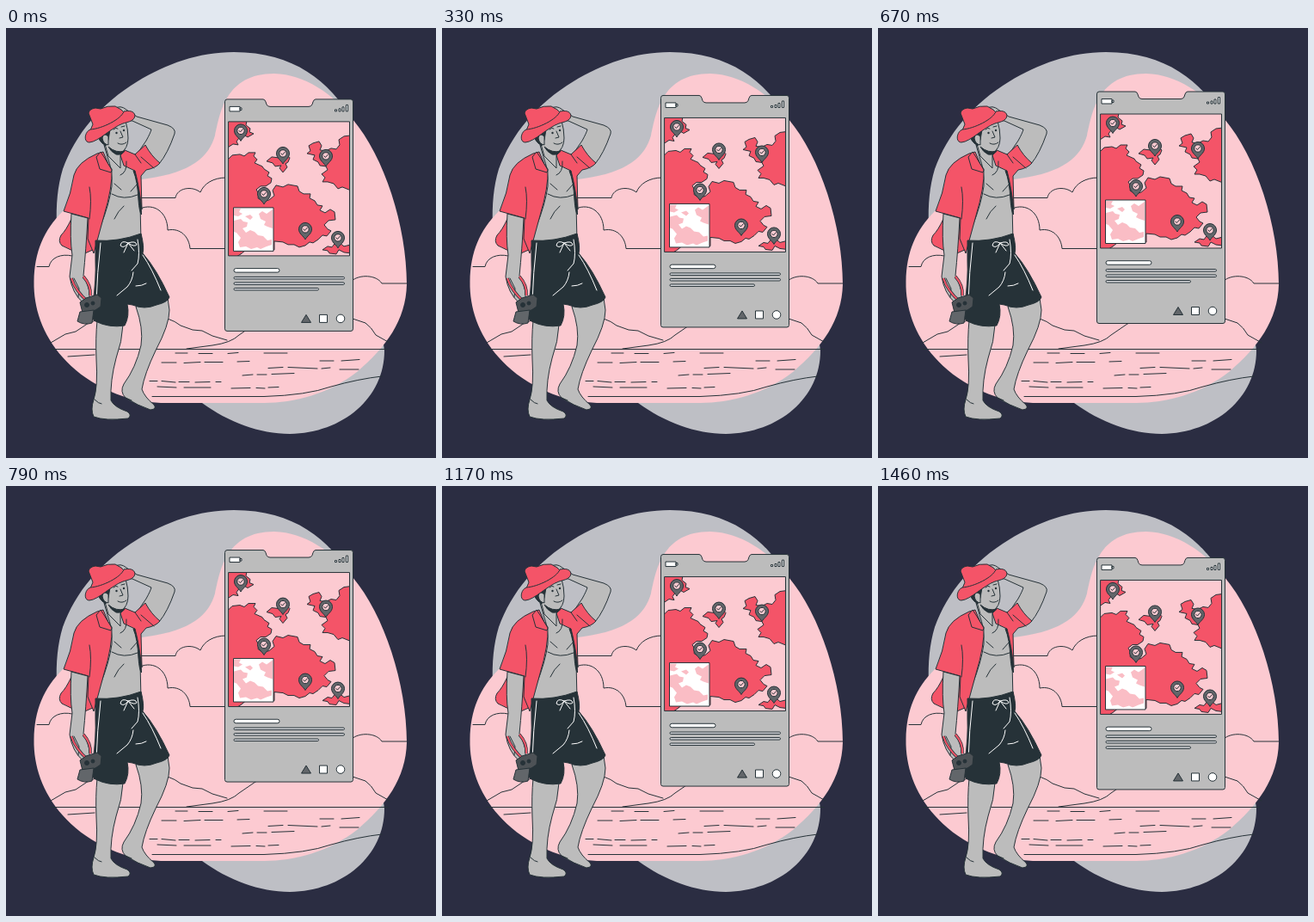
Recreate the animation shown at these times as an HTML page. Size 500 px wide and 500 px high, loop 1500 ms.

```html
<!DOCTYPE html>
<html lang="en">
<head>
<meta charset="utf-8">
<title>Traveller and map</title>
<style>
  html, body { margin: 0; width: 100%; height: 100%; overflow: hidden; background: #2b2d42; }
  svg { display: block; width: 100vw; height: 100vh; }
  .ln { fill: none; stroke: #263238; stroke-width: 1; stroke-linecap: round; stroke-linejoin: round; }
  .ol { stroke: #263238; stroke-width: 1; stroke-linejoin: round; }
  .wt { fill: none; stroke: #fff; stroke-width: 1; stroke-linecap: round; }
  .skin { fill: #bcbcbc; }
  .red { fill: #f45468; }
  .pink { fill: #fccad1; }
  .rose { fill: #fabdc5; }
  .dark { fill: #263238; }
  .steel { fill: #62666a; }
  .white { fill: #fff; }
</style>
</head>
<body>
<svg viewBox="0 0 500 500">
  <defs>
    <clipPath id="screen"><path d="M259 109H399.500V265H259Z"/></clipPath>
    <g id="pin">
      <path class="steel ol" d="M0 12C-2 8-7.500 5.500-7.500 0A7.500 7.500 0 0 1 7.500 0C7.500 5.500 2 8 0 12Z"/>
      <circle class="pink ol" r="4.200"/>
      <path class="ln" d="M-2 0L-.6 1.600L2.300-1.700"/>
    </g>
  </defs>

  <!-- backdrop -->
  <path fill="#bebfc5" d="M265 28C224 28 186 42 153 62C110 88 81 123 66 164C60 184 58 205 59 230L120 390L228 436C258 458 295 472 330 472C392 471 440 430 440 375L403 107C376 62 335 28 265 28Z"/>
  <path class="pink" d="M32.500 295C33 260 44 235 66 213C90 190 125 180 165 175C215 168 236 150 243 125C249 99 255 53 312 53C347 54 380 76 403 106C440 150 466 230 466 298C465 340 442 371 408 400C376 425 335 436 300 436H180C130 434 90 410 66 383C42 356 32 325 32.500 295Z"/>

  <!-- landscape -->
  <g class="ln">
    <path d="M154 197.500H197C199 186 216 183 226 191C230 181 241 174 256 174"/>
    <path d="M156 210C172 203 188 214 188 235C203 232 213 243 214 256.500H256"/>
    <path d="M36 277.500H50C52 267 64 262 77 265"/>
    <path d="M402 294C411 286 431 287 437 297H466"/>
    <path d="M52 366L69 356L81 353L96 343L107 339M188 338Q197 341 203 346L217 351L228 352L240 358L257 363"/>
    <path d="M210 373L240 369Q262 366 271 357L290 344L310 335L350 325L386 331L403 338L418 343Q425 348 430 357L446 366"/>
    <path d="M52 373.500H444M170 428.500H300Q350 427 378 417Q410 408 437 405"/>
    <path d="M72 382L103 380M197 378H211M224 378.500H240M258 378.500L270 377.500M300 378H327M181 389H198M207 389.500L226 388.500M231 388.500H252M269 388L283 387.500M365 387H381M390 387L411 385.500M305 395.500L322 394.500M328 394.500L362 396M367 396L377 395M388 397H410M275 404L287 403M292 403H303M309 402.500L335 401.500M167 410.500H176M181 410.500L197 412M201 411.500H213M220 412L237 411.500M244 411.500H250M176 417L198 418M207 418H238M262 419L284 418.500M291 418.500L301 419M305 418L317 417.500"/>
  </g>

  <!-- traveller -->
  <g class="ol">
    <path class="skin" d="M126 94Q133 89 140 95L152 103L188 113Q198 117 196 123Q188 146 178 158L150 150L163 131Q168 122 169 118L147 108L130 106Z"/>
    <path class="skin" d="M151 324Q160 349 157 369Q151 395 137 414Q132 423 139 430Q153 439 168 444Q176 443 172 438Q161 429 158 420Q161 402 174 375Q190 345 190 328L188 314Z"/>
    <path class="skin" d="M106 340Q104 360 105 385Q107 417 102 432Q98 444 102 452Q115 457 142 454Q147 450 141 446Q126 441 122 433Q121 410 128 384Q135 365 136 345Z"/>
    <path class="red" d="M76 222Q70 235 64 241Q60 248 65 253Q76 257 85 265L103 257L113 220L100 180Z"/>
    <path class="skin" d="M114 136L118 150Q124 165 123 184Q120 205 110 230L104 248H157L156 205L153 166L138 148L132 140Z"/>
    <path class="dark" d="M150 163Q157 182 157.500 217Q155 214 154 200Q153 178 148 166Z"/>
    <path class="red" d="M135 146L138 142L150 147L162 136Q169 149 179 157Q174 163 163 165L157 172L158 211Q155 185 150 166L137 160L133 148Z"/>
    <path class="red" d="M106 146L113 144L119 158L123 164Q124 185 114 218L102 262L95 245L96 221L67 213Q76 192 79 171Q83 156 106 146Z"/>
    <path class="red" d="M110 144L105 150L109 164L122 168L123 165L114 150Z"/>
    <path class="dark" d="M104 247Q130 249 157 239Q161 255 159 262Q175 280 190 313Q188 319 175 322Q161 328 147 322L141 321Q144 335 138 346Q120 349 104 341Q98 340 101 320Q105 291 104 270Z"/>
    <path class="skin" d="M76 216Q74 245 77 264L74 289Q77 308 89 319L96 319Q100 306 90 288Q93 258 95 221Z"/>
  </g>
  <g class="ln">
    <path d="M140 155Q141 168 133 171M123 193Q137 201 153 194M126 181L134 188M145 190L153 181M137 207Q130 213 126 222M97 222Q100 200 97 185M157 150L172 163M150 147L157 157M79 291L85 303L84 313"/>
    <path d="M103 432Q108 437 111 437M139 430L146 433"/>
  </g>
  <g class="wt">
    <path d="M110 250Q106 285 105 318M153 246Q156 263 153 274L146 282M148 284Q147 294 141 301L129 311M159 264Q170 280 180 305M151 300Q158 300 163 297"/>
    <path d="M142 250Q134 246 133 253Q137 257 142 250Q151 247 152 252Q149 255 142 250L137 261M142 250L149 259"/>
  </g>
  <path fill="none" stroke="#263238" stroke-width="3.500" d="M76 291Q81 306 95 318M90 289Q99 299 98 311"/>
  <path fill="none" stroke="#f45468" stroke-width="2" d="M76 291Q81 306 95 318M90 289Q99 299 98 311"/>
  <g class="ol">
    <path fill="#4d5256" d="M86 319L93 314L106 310L111 314L110 324L104 328L89 331Z"/>
    <path class="steel" d="M86 330L102 328L100 343Q91 346 83 341Z"/>
    <circle class="dark" cx="94" cy="322" r="2.500"/>
    <circle class="dark" cx="101" cy="320" r="2"/>
  </g>

  <!-- head -->
  <g class="ol">
    <path class="skin" d="M113 115L115 135L119 149L133 163L133 146Q142 140 142 128Q142 118 139 108L126 104Z"/>
    <path class="dark" d="M106 121L115 112L126 107L125 113L121 118L119 130L116 137Q107 132 106 121Z"/>
    <path class="dark" d="M119 138Q128 146 138 143Q135 148 128 147Q122 144 119 138Z"/>
    <path class="skin" d="M119 126Q113 121 112 128Q113 135 119 136Z"/>
    <path class="red" d="M98 119L101 112L96 99Q97 94 104 93L110 94Q118 90 127 91L134 95L138 99C130 109 113 118 98 119Z"/>
    <path class="red" d="M98 118C91 121 90 133 97 133C108 132 122 116 136 111C143 109 149 108 150 102C149 96 143 96 137 97C134 106 112 117 98 118Z"/>
  </g>
  <path class="ln" d="M125 118Q128 115 130 117M134 115L138 114M133 120L136 127L132 128M130 134Q135 137 140 133"/>
  <circle class="dark" cx="128.500" cy="122" r="1.200"/>
  <circle class="dark" cx="137" cy="119" r="1.200"/>

  <!-- phone -->
  <g id="phone">
    <path class="skin ol" d="M257 83H299Q301 83 302 86L303 89Q304 91.500 307 91.500H352Q355 91.500 356 89L357 86Q358 83 360 83H401Q403.500 83 403.500 86V350Q403.500 352.500 401 352.500H257Q254.500 352.500 254.500 350V86Q254.500 83 257 83Z"/>
    <path class="white ol" d="M260 91.500H272V97H260ZM272 93H274V95.500H272Z"/>
    <path class="white ol" d="M382.500 95H384.500V97H382.500ZM387 94H389V97H387ZM391 92H393V97H391ZM395.500 89.500H397.500V97H395.500Z"/>
    <g clip-path="url(#screen)">
      <path class="pink" d="M259 109H400V265H259Z"/>
      <g class="red ol">
        <path d="M258 108H280L279 113L284 117L283 121L288 123L281 127L276 124L271 128L268 132L270 136L264 135L258 139Z"/>
        <path d="M258 153L263 148L272 147L277 149L282 145L290 145L288 149L292 153L289 157L298 161L300 164L306 168L304 172L309 175L308 180L302 184L296 184L291 188L294 193L293 198L299 202L306 200L312 195L310 189L314 183L322 185L328 182L339 184L341 190L346 193L354 193L353 198L359 201L362 206L368 207L365 212L371 215L377 211L382 214L383 223L375 224L370 229L374 234L378 236L373 242L368 241L363 246L357 250L353 249L348 253L341 255L335 252L328 252L322 249L312 248V258L300 259L278 259L273 263L268 266H258Z"/>
        <path d="M303 155L309 150L317 151L327 148L330 151L328 156L325 158L327 162L322 168L318 163L320 160L313 161L310 157Z"/>
        <path d="M350 146L354 143L352 137L357 134L364 132L367 137L365 142L372 143L378 140L384 141L388 136L387 130L393 126L401 125V189L391 185L386 187L381 181L374 179L368 179L371 174L367 170L374 165L372 161L365 160L363 156L357 153L359 148Z"/>
        <path d="M368 258L374 254L379 255L382 251L388 250L393 254L401 252V262L393 261L387 258L384 263L376 262L374 259Z"/>
      </g>
    </g>
    <path class="ln" d="M259 109H399.500V265H259Z"/>
    <path class="white ol" d="M264.500 209H311V259.500H264.500Z"/>
    <path class="rose" d="M265 210H273L271 214L275 216L270 219L265 218ZM265 224L273 222L276 225L281 226L280 231L275 233L279 238L284 235L289 237L293 241L299 242L304 247L309 246V252L303 254L296 257L292 255L285 257L279 254L272 255L270 249L273 244L268 238L265 237ZM278 219L284 217L287 220L284 223ZM294 216L298 213L303 216L310 211V233L304 231L300 229L302 225L296 222Z"/>
    <g id="pins"></g>
    <rect class="white ol" x="265" y="279.700" width="53" height="4.500" rx="2.250"/>
    <g class="ol" fill="#d9dade">
      <rect x="265" y="289.500" width="128.500" height="2.500" rx="1.250"/>
      <rect x="265" y="296" width="128.500" height="2.500" rx="1.250"/>
      <rect x="265" y="302.500" width="98.500" height="2.500" rx="1.250"/>
    </g>
    <path class="steel ol" d="M349 333.500L354.500 342.500H343.500Z"/>
    <path class="white ol" d="M364.500 333.500H373.500V342.500H364.500Z"/>
    <circle class="white ol" cx="389" cy="338" r="4.800"/>
  </g>
</svg>
<script>
  const LOOP = 1500, STEPS = 36, REST = 0.45, RISE = 10;
  const phone = document.getElementById('phone');
  const pinSpots = [[273, 119.5], [322, 146], [372, 149], [300, 193], [348, 234], [386, 244]];

  document.getElementById('pins').innerHTML = pinSpots
    .map(([x, y]) => `<use href="#pin" x="${x}" y="${y}"/>`).join('');

  // The phone floats up and down at constant speed, stepped at 24 per second.
  function draw() {
    const t = performance.now() % LOOP;
    const step = Math.floor(t / LOOP * STEPS + 1.1) % STEPS;
    const lift = RISE * (1 - Math.abs(1 - 2 * step / STEPS));
    phone.setAttribute('transform', `translate(0 ${REST - lift})`);
    requestAnimationFrame(draw);
  }
  draw();
</script>
</body>
</html>
```
